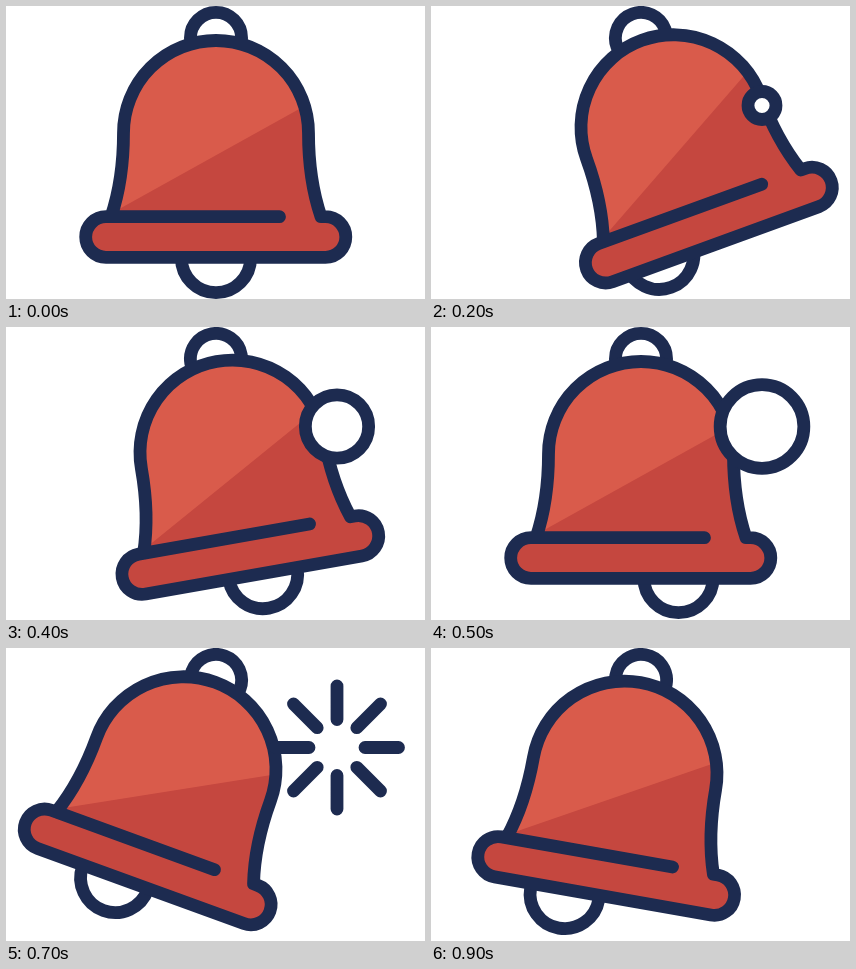
An HTML page for the animation above (1000 ms loop, 419 by 293 pixels).

```html
<!DOCTYPE html>
<html lang="en">
<head>
<meta charset="utf-8">
<title>Ringing bell</title>
<style>
  html, body { margin: 0; width: 100%; height: 100%; overflow: hidden; background: #fff; }
  svg { display: block; width: 100%; height: 100%; }
  .line { stroke: #1d2b50; stroke-width: 12.8; stroke-linecap: round; stroke-linejoin: round; }
</style>
</head>
<body>
<svg viewBox="0 0 419 293">
  <defs>
    <path id="shape" d="M273.5 210.7H100A20.3 20.3 0 0 0 100 251.3H319.5A20.3 20.3 0 0 0 319.5 210.7H315
      C308 190 302.5 160 302.5 127A92.5 92.5 0 0 0 117.5 127C117.5 160 112 190 105 210.7"/>
    <clipPath id="inside"><use href="#shape"/></clipPath>
  </defs>
  <g id="bell">
    <circle class="line" cx="210" cy="32" r="25.6" fill="#fff"/>
    <circle class="line" id="clapper" r="34.6" fill="#fff"/>
    <use href="#shape" fill="#d95b4b"/>
    <path d="M59 233L351 71V270H59Z" fill="#c5473f" clip-path="url(#inside)"/>
    <use href="#shape" class="line" fill="none"/>
  </g>
  <g transform="translate(331 99.5)">
    <circle class="line" id="ring" fill="#fff"/>
    <path class="line" id="rays" fill="none"/>
  </g>
</svg>
<script>
const el = id => document.getElementById(id);
const bell = el('bell'), clapper = el('clapper'), ring = el('ring'), rays = el('rays');
const pivot = { x: 210, y: 32 };

const STEP = 100; // the picture advances ten times a second
const tilt = [0, -10, -20, -20, -10, 0, 10, 20, 20, 10];
// clapper centre relative to the pivot, in the bell's own axes
const swing = [[0, 220], [-30, 217], [-57, 210], [-24, 216], [9, 220],
               [37.5, 219], [3, 220], [-27, 220.5], [-50, 222], [-38, 224]];
// inner and outer radius of the burst
const burst = { 7: [28, 61.5], 8: [52, 69.5] };

function rayPath([a, b]) {
  let d = '';
  for (let i = 0; i < 8; i++) {
    const c = Math.cos(i * Math.PI / 4), s = Math.sin(i * Math.PI / 4);
    d += `M${a * c} ${a * s}L${b * c} ${b * s}`;
  }
  return d;
}

function draw(k) {
  bell.setAttribute('transform', `rotate(${tilt[k]} ${pivot.x} ${pivot.y})`);
  clapper.setAttribute('cx', pivot.x + swing[k][0]);
  clapper.setAttribute('cy', pivot.y + swing[k][1]);
  const growing = k > 0 && k < 7;
  ring.style.display = growing ? '' : 'none';
  ring.setAttribute('r', 6.08 * k + 0.458 * k * k);
  rays.setAttribute('d', burst[k] ? rayPath(burst[k]) : '');
}

const start = performance.now();
function tick() {
  draw(Math.floor((performance.now() - start) / STEP) % 10);
  requestAnimationFrame(tick);
}
tick();
</script>
</body>
</html>
```
